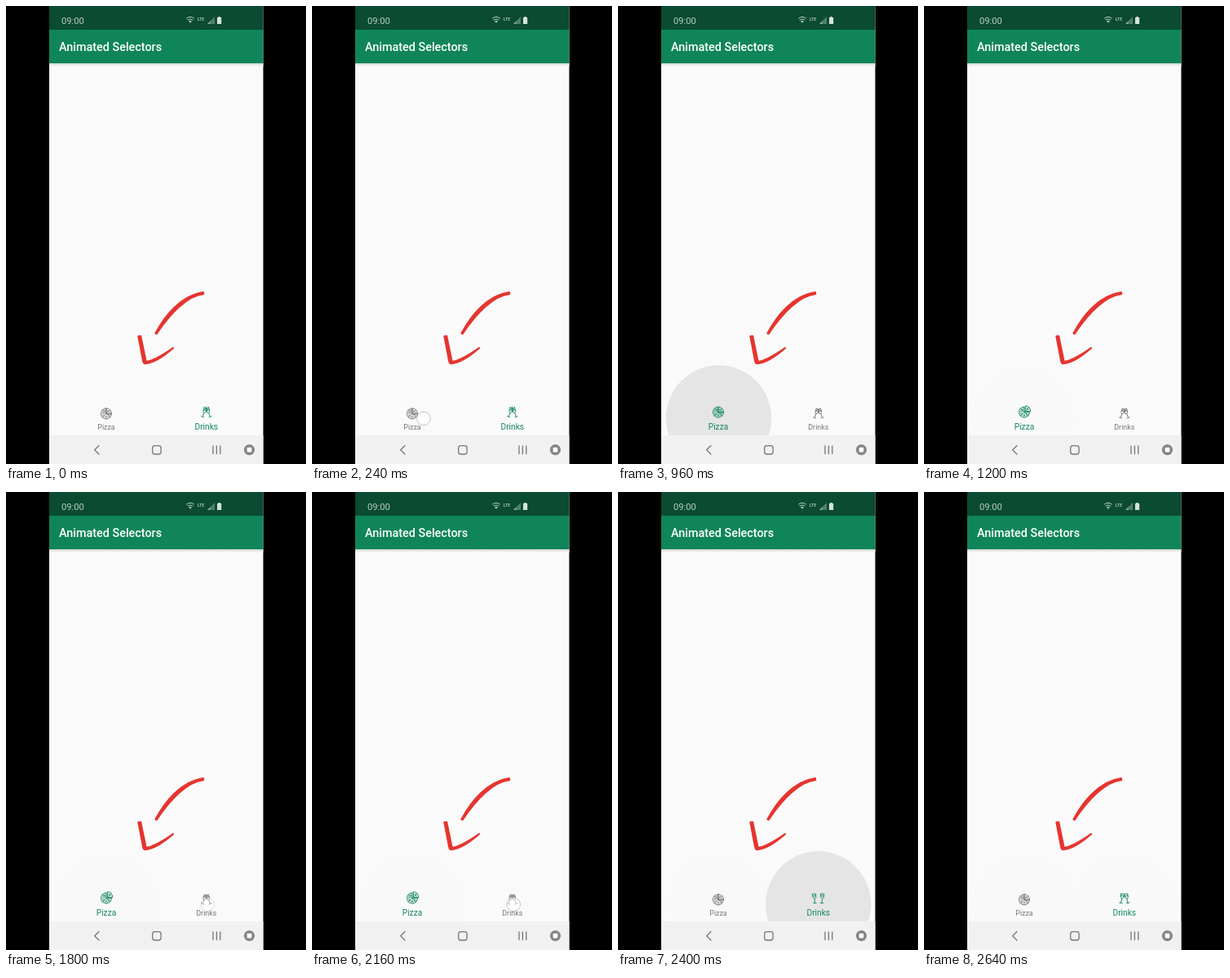
Recreate the animation shown at these times as an HTML page. Size 368 by 560 pixels, loop 2760 ms.

```html
<!DOCTYPE html>
<html lang="en">
<head>
<meta charset="utf-8">
<title>Animated Selectors</title>
<style>
  html, body { margin: 0; width: 100%; height: 100%; overflow: hidden; background: #000; }
  svg { display: block; width: 368px; height: 560px; font-family: Roboto, sans-serif; }
  .line { fill: none; stroke: currentColor; stroke-linecap: round; stroke-linejoin: round; }
</style>
</head>
<body>
<svg viewBox="0 0 368 560">
  <defs>
    <clipPath id="content"><rect x="53" y="70" width="262.5" height="455"/></clipPath>
    <linearGradient id="shadow" x2="0" y2="1">
      <stop stop-color="#d2d5d3"/><stop offset="1" stop-color="#fafafa"/>
    </linearGradient>
    <g id="flute" class="line" stroke-width="0.9">
      <path d="M-2-6H2L1.7-1.6Q0 1.4-1.7-1.6ZM0 .2V5M-1.8 5.2H1.8"/>
      <path d="M-1.7-3.6H1.7" stroke-width="1.1"/>
    </g>
  </defs>
  <rect width="368" height="560"/>
  <rect x="53" width="262.5" height="560" fill="#fafafa"/>
  <rect x="53" y="70" width="262.5" height="4" fill="url(#shadow)"/>
  <rect x="53" width="262.5" height="29" fill="#0a4b32"/>
  <rect x="53" y="29" width="262.5" height="41" fill="#10855a"/>

  <!-- status bar -->
  <g fill="#b9cfc5">
    <text x="68" y="22" font-size="11.2">09:00</text>
    <text x="234.7" y="18" font-size="5.4" font-weight="500">LTE</text>
    <path d="M247 22L256 13V22Z" fill="#4f7f6b"/>
    <path d="M247 22L250.5 18.5V22Z" fill="#86a99b"/>
    <path d="M260.4 13H262.8V14H264.2V22H259V14H260.4Z" fill="#d5e2dc"/>
    <g class="line" style="color:#b9cfc5" stroke-width="1">
      <path d="M221.5 15Q226 11.4 230.5 15M223 17Q226 14.6 229 17M224.6 18.8Q226 17.8 227.4 18.8"/>
    </g>
    <circle cx="226" cy="19.6" r="0.9"/>
  </g>
  <text x="65" y="55.2" font-size="14.4" font-weight="500" fill="#fff">Animated Selectors</text>

  <g id="ripples" clip-path="url(#content)">
    <circle id="pizzaRipple" cy="504"/>
    <circle id="drinksRipple" cy="504"/>
  </g>

  <!-- hand-drawn arrow -->
  <g fill="#e5352f" stroke="#e5352f" stroke-linejoin="round" stroke-linecap="round">
    <path d="M183.7 400.2C195 379 215 354 241.7 350.2L242 352C222 354 201 376 184.6 400.5Z" stroke-width="2.6"/>
    <path d="M162.4 403.8L165.2 403.6L171.6 434.8Q181 434.8 205 418.2Q184 436.6 170.4 437.2Q168.5 436.5 168.2 434Z" stroke-width="2.2"/>
  </g>

  <!-- bottom tabs -->
  <g id="pizza">
    <g id="pizzaIcon" class="line" stroke-width="1">
      <path d="M0 0V-6.5A6.5 6.5 0 1 0 6.5 0ZM0 0L-4.6 4.6M0 0L4.6 4.6M0 0L-4.6-4.6"/>
      <path d="M-1.5-4.9A5 5 0 1 0 4.9 1.5" stroke-width="0.6"/>
      <path d="M-3.4-.8h.8M-.4 3.4h.8M-1.8-3.2h.3M2.7 1.6h.3M-3 1.8h.3" stroke-width="1.3"/>
      <g id="slice">
        <path d="M0 0V-6.5A6.5 6.5 0 0 1 6.5 0ZM0 0L4.6-4.6"/>
        <path d="M1.8-3.4h.3M3.4-1.6h.3" stroke-width="1.3"/>
      </g>
    </g>
    <text id="pizzaLabel" x="123" y="517.6" text-anchor="middle" fill="currentColor">Pizza</text>
  </g>
  <g id="drinks">
    <g id="drinksIcon">
      <use id="leftGlass" href="#flute"/>
      <use id="rightGlass" href="#flute"/>
      <path id="sparks" class="line" stroke-width="0.8" d="M-.3-6.2V-7.6M-2.4-6.2L-3.2-7.2M2-6.2L2.8-7.2"/>
    </g>
    <text id="drinksLabel" x="245.8" y="517.6" text-anchor="middle" fill="currentColor">Drinks</text>
  </g>
  <circle id="touch" r="8.3" fill="#fff" fill-opacity="0.55" stroke="#c4c4c4"/>

  <!-- navigation bar -->
  <rect x="53" y="525" width="262.5" height="35" fill="#f1f1f1"/>
  <g class="line" style="color:#777" stroke-width="1.3">
    <path d="M114 537.5L108.7 542.7L114 548"/>
    <rect x="179.7" y="537.6" width="10.4" height="10.4" rx="2.8"/>
    <path d="M254 538V547.6M258.4 538V547.6M262.8 538V547.6"/>
  </g>
  <circle cx="298.5" cy="542.6" r="6.6" fill="#858585"/>
  <rect x="295.7" y="539.8" width="5.6" height="5.6" rx="0.8" fill="#fff"/>
</svg>
<script>
const LOOP = 2760, STEP = 120;
const GREEN = '#16885f', GREY = '#777777';
const PIZZA_TAP = 6, DRINKS_TAP = 18;
const $ = id => document.getElementById(id);
const set = (id, attrs) => {
  for (const key in attrs) $(id).setAttribute(key, attrs[key]);
};
const within = (n, from, to) => n >= from && n < to;

function drawRipple(id, age, touchX, centerX) {
  const opacity = age < 1 ? 0 : [0.068, 0.088, 0.04, 0.005][Math.min(age - 1, 3)];
  set(id, { cx: age === 1 ? touchX : centerX, r: age === 1 ? 38.7 : 64.7, opacity });
}

function drawTab(name, selected, raised) {
  $(name).style.color = selected ? GREEN : GREY;
  set(name + 'Label', { 'font-size': raised ? 10.2 : 8.9 });
}

function drawGlasses(spread, tilt, sparks) {
  set('leftGlass', { transform: `translate(${-spread} 0) rotate(${tilt})` });
  set('rightGlass', { transform: `translate(${spread} 0) rotate(${-tilt})` });
  set('sparks', { opacity: sparks ? 1 : 0 });
}

function drawTouch(n) {
  const onPizza = within(n, 1, PIZZA_TAP + 2);
  const onDrinks = within(n, 15, DRINKS_TAP + 2);
  const arriving = n === 1 || n === 15;
  set('touch', {
    cx: onDrinks ? 247.3 : n > PIZZA_TAP ? 139 : 137,
    cy: 504.4,
    opacity: !(onPizza || onDrinks) ? 0 : arriving ? 0.5 : 1
  });
}

function render(time) {
  const n = Math.floor((time % LOOP) / STEP);
  const pizzaAge = n - PIZZA_TAP, drinksAge = n - DRINKS_TAP;
  const pizzaOn = pizzaAge >= 1 && drinksAge < 1;
  const pizzaRaised = pizzaAge >= 2 && drinksAge < 2;

  drawRipple('pizzaRipple', pizzaAge, 138, 123.5);
  drawRipple('drinksRipple', drinksAge, 247, 245.8);
  drawTab('pizza', pizzaOn, pizzaRaised);
  drawTab('drinks', !pizzaOn, !pizzaRaised);

  set('pizzaIcon', { transform: `translate(123 ${pizzaRaised ? 496.6 : 498.4})` });
  const open = pizzaRaised ? Math.min(Math.max(pizzaAge - 2, 0) / 2, 1) * 1.3 : 0;
  set('slice', { transform: `translate(${open} ${-open})` });

  set('drinksIcon', { transform: `translate(245.8 ${pizzaRaised ? 498.6 : 497.4})` });
  if (within(drinksAge, 2, 5)) {
    const closing = (drinksAge - 2) / 2;
    drawGlasses(4.7 - 1.5 * closing, -4 + 16 * closing, false);
  } else {
    drawGlasses(2.9, 21, !pizzaRaised);
  }
  drawTouch(n);
}

const start = performance.now();
function tick(now) {
  render(Math.max(0, now - start));
  requestAnimationFrame(tick);
}
render(0);
requestAnimationFrame(tick);
</script>
</body>
</html>
```
